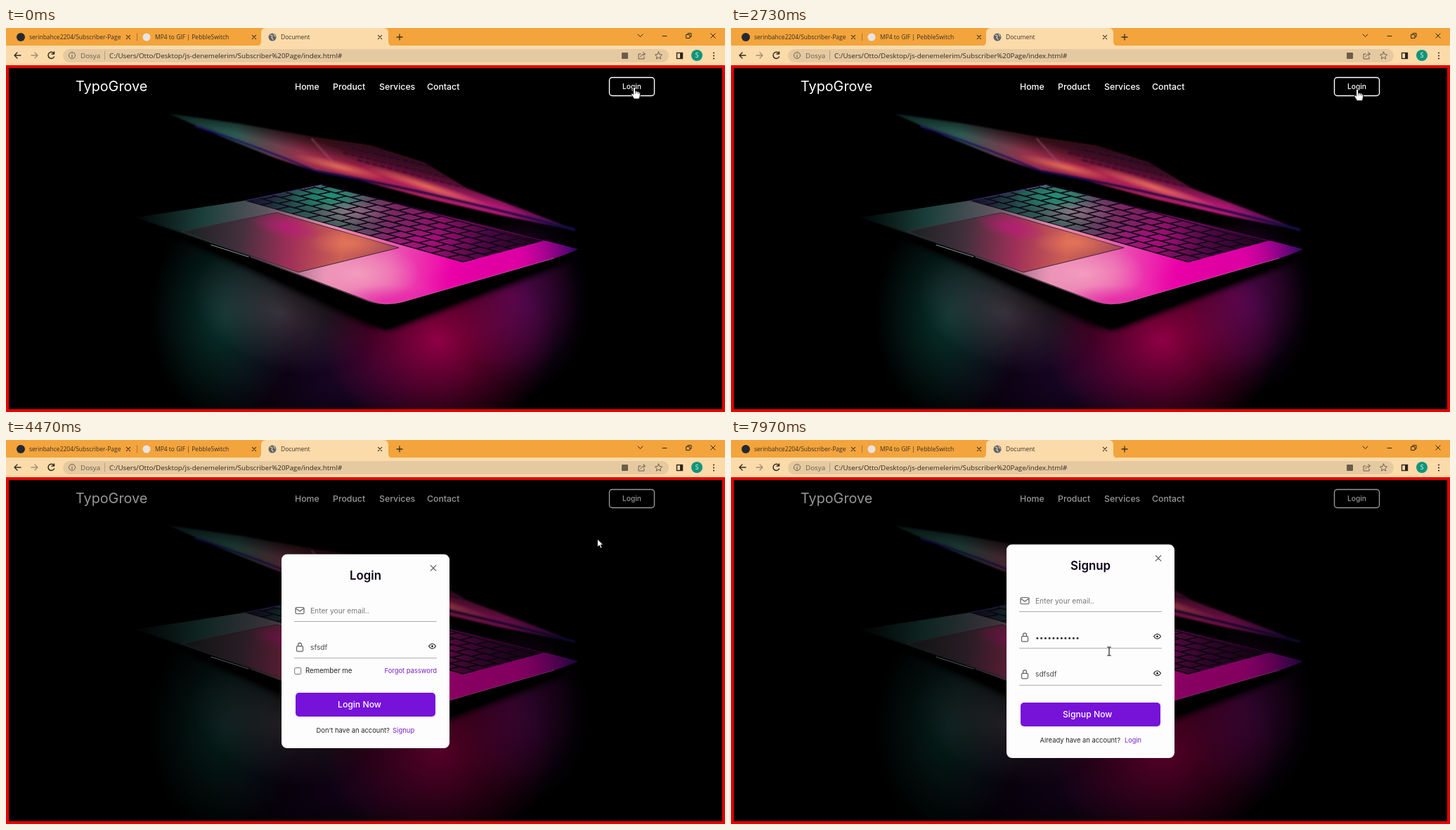
Animation of 1023x547 px, one loop 8000 ms. Source, as an HTML page:

```html
<!DOCTYPE html>
<html lang="en">
<head>
<meta charset="utf-8">
<title>Login popup</title>
<style>
html, body { margin: 0; width: 100%; height: 100%; overflow: hidden; background: #000; }
svg { display: block; width: 100%; height: 100%; }
text { font-family: Inter, sans-serif; white-space: pre; }
.ui text { font-family: "Open Sans", "Noto Sans", sans-serif; }
.line { fill: none; stroke-linecap: round; stroke-linejoin: round; }
</style>
</head>
<body>
<svg id="stage" viewBox="0 0 1023 547" preserveAspectRatio="none" xmlns="http://www.w3.org/2000/svg"></svg>
<script>
const LOOP = 8000, OPEN_AT = 4010, SWITCH_AT = 6200;
const PURPLE = '#7712d9', LINK = '#7a1fc4';

const text = (x, y, size, fill, str, extra = '') =>
  `<text x="${x}" y="${y}" font-size="${size}" fill="${fill}" ${extra}>${str}</text>`;
const line = (d, color, width = 1, extra = '') =>
  `<path class="line" d="${d}" stroke="${color}" stroke-width="${width}" ${extra}/>`;
const rect = (x, y, w, h, fill, rx = 0, extra = '') =>
  `<rect x="${x}" y="${y}" width="${w}" height="${h}" rx="${rx}" fill="${fill}" ${extra}/>`;
const circle = (x, y, r, fill, extra = '') =>
  `<circle cx="${x}" cy="${y}" r="${r}" fill="${fill}" ${extra}/>`;
const poly = (points, fill, extra = '') => `<polygon points="${points}" fill="${fill}" ${extra}/>`;
const cross = (x, y, r, color, width) =>
  line(`M${x - r} ${y - r}l${2 * r} ${2 * r}M${x + r} ${y - r}l${-2 * r} ${2 * r}`, color, width);
const glow = (x, y, rx, ry, color, opacity = 1, angle = 0) =>
  `<ellipse rx="${rx}" ry="${ry}" fill="url(#glow-${color.slice(1)})" opacity="${opacity}" transform="translate(${x} ${y}) rotate(${angle})"/>`;

const GLOWS = ['#0d4a42', '#13a07c', '#a8004f', '#e000a0', '#52107a', '#f5a0c0', '#ff8a5a', '#c01880', '#5a4a58', '#000000'];

function linear(id, x1, y1, x2, y2, ...colors) {
  const stops = colors.map((c, i) => `<stop offset="${i / (colors.length - 1)}" stop-color="${c}"/>`);
  return `<linearGradient id="${id}" gradientUnits="userSpaceOnUse" x1="${x1}" y1="${y1}" x2="${x2}" y2="${y2}">${stops.join('')}</linearGradient>`;
}

const BASE = 'M184 270L345 245L450 223Q625 266 814 315Q800 322 780 328L565 390Q540 397 515 388L345 324Z';
const KEYBOARD = '340,246 450,224 765,303 650,334';
const LID = '232,122 330,136 440,156 520,168 595,192 655,228 735,258 814,289 700,266 600,243 500,216 440,204 380,184 300,152';

function defs() {
  const radial = GLOWS.map(c => `<radialGradient id="glow-${c.slice(1)}">
    <stop offset="0" stop-color="${c}"/><stop offset=".5" stop-color="${c}" stop-opacity=".5"/>
    <stop offset="1" stop-color="${c}" stop-opacity="0"/></radialGradient>`).join('');
  return `<defs>${radial}
    ${linear('lid', 232, 120, 800, 290, '#06211f', '#2c5a50', '#94304c', '#a8204c', '#b02060', '#b8187a', '#30084a')}
    ${linear('lid-shade', 531, 166, 520, 205, '#000000d8', '#000000a0', '#00000000')}
    ${linear('body', 190, 275, 818, 315, '#010807', '#1b3f3a', '#5d5560', '#e58cb0', '#ea5ab0', '#ee00aa', '#d800a8', '#2a0860')}
    ${linear('pad', 262, 290, 550, 315, '#1d2224', '#43303c', '#a02f58', '#cc6055', '#a84a58')}
    ${linear('keys', 345, 246, 750, 310, '#140c28', '#24504c', '#4a625e', '#782862', '#8a1266', '#4a0842', '#20051f')}
    <filter id="soft"><feGaussianBlur stdDeviation="1.2"/></filter>
    <filter id="shadow-blur"><feGaussianBlur stdDeviation="4"/></filter>
    <clipPath id="body-clip"><path d="${BASE}"/></clipPath>
    <clipPath id="keys-clip"><polygon points="${KEYBOARD}"/></clipPath>
    <clipPath id="lid-clip"><polygon points="${LID}"/></clipPath>
    <clipPath id="page-clip"><rect x="4" y="57" width="1015" height="486"/></clipPath>
    <clipPath id="tab-clip"><rect x="30" y="0" width="133" height="25"/></clipPath>
  </defs>`;
}

function keyCaps() {
  let caps = '';
  for (let row = 0; row < 6; row++)
    for (let col = -1; col < 14; col++)
      caps += `<rect x="${(col + row % 3 * .3) / 14}" y="${row / 6}" width="${1 / 14}" height="${1 / 6}"/>`;
  return `<g clip-path="url(#keys-clip)"><g transform="matrix(310 87 112 -25 340 246)" fill="none" stroke="#120818" stroke-width="1.3">
    ${caps.replaceAll('/>', ' vector-effect="non-scaling-stroke"/>')}</g></g>`;
}

function photo() {
  return `<g clip-path="url(#page-clip)">
    ${glow(310, 410, 105, 150, '#0d4a42', .7)}
    ${glow(390, 405, 130, 80, '#5a4a58', .6, 22)}
    ${glow(480, 500, 190, 110, '#52107a', .3)}
    ${glow(615, 445, 165, 140, '#a8004f', .85)}
    ${glow(720, 385, 95, 110, '#a8004f', .45)}
    ${glow(740, 390, 90, 130, '#52107a', .45)}
    ${poly('180,272 345,325 540,392 812,318 795,336 548,430 520,426 345,343', '#000', 'filter="url(#shadow-blur)"')}
    ${poly('180,272 345,325 540,394 812,318 790,334 540,430 345,340', '#000', 'filter="url(#soft)"')}
    <g filter="url(#soft)">
      ${poly(LID, 'url(#lid)')}
      <g clip-path="url(#lid-clip)">
        ${glow(545, 180, 90, 18, '#c01880', .6, 15)}
        ${poly(LID, 'url(#lid-shade)')}
        ${glow(475, 198, 70, 8, '#ff8a5a', .7, 14)}
        ${glow(600, 226, 100, 8, '#ff8a5a', .7, 18)}
        ${line('M480 178L625 212M490 171L610 199M500 188L650 227', '#26062f', 2, 'stroke-dasharray="7 4"')}
      </g>
      ${line('M270 140Q350 166 440 203', '#1c0e5a', 3)}
      ${line('M443 204Q600 232 808 287', '#160a44', 4)}
      ${line('M435 158L467 193', '#b0607a', 1)}
    </g>
    <path d="${BASE}" fill="url(#body)"/>
    <g clip-path="url(#body-clip)">
      ${glow(500, 350, 90, 42, '#f5a0c0', .9)}
      ${glow(700, 340, 110, 38, '#e000a0', .9, -15)}
      ${glow(540, 388, 75, 22, '#e000a0', .5)}
      ${glow(250, 298, 90, 10, '#000000', .7, 18)}
    </g>
    ${poly('250,290 385,263 559,313 416,348', 'url(#pad)', 'stroke="#3d2536" stroke-width="1"')}
    ${glow(400, 284, 52, 17, '#c01880', .7, 12)}
    ${glow(490, 306, 60, 20, '#ff8a5a', .5)}
    ${poly(KEYBOARD, 'url(#keys)')}
    <g clip-path="url(#keys-clip)">
      ${glow(460, 240, 60, 22, '#13a07c', .8)}
      ${glow(490, 262, 60, 18, '#f5a0c0', .35)}
      ${glow(590, 302, 80, 22, '#e000a0', .4)}
    </g>
    ${keyCaps()}
    ${line('M450 223L768 302', '#0a0410', 2.5)}
    ${line('M340 246L450 223', '#3a2a78', 1.2)}
    ${line('M292 309L345 326', '#7f9089', 1.2)}
    ${line('M348 326L515 389Q540 397 565 390L780 328', '#f0a0c8', .8, 'opacity=".6"')}
  </g>`;
}

function browser() {
  const ink = '#3a3024', gray = '#6b5d4a';
  return `<g class="ui">
    ${rect(0, 0, 1023, 26, '#f3a43c')}
    <path d="M356 26Q363 26 363 19V7Q363 0 370 0H537Q544 0 544 7V19Q544 26 551 26Z" fill="#fcdbaa"/>
    ${rect(0, 25, 1023, 28, '#fcdbaa')}
    ${rect(81, 30, 862, 19, '#e5c9a0', 9.5)}
    ${circle(21, 13, 6, '#24292f')}
    ${text(33, 16, 8.5, ink, 'serinbahce2204/Subscriber-Pages', 'clip-path="url(#tab-clip)"')}
    ${circle(200, 13, 5.5, '#e9e4e2')}
    ${text(212, 16, 8.5, ink, 'MP4 to GIF | PebbleSwitch')}
    ${circle(379, 13, 5.5, '#5f6368')}
    ${line('M376 10l3 1l-1 3l2 2M381 9l2 3', '#e9d2ae', 1.2)}
    ${text(391, 16, 8.5, ink, 'Document')}
    ${[174, 353, 532].map(x => cross(x, 13, 2.6, ink, 1.1)).join('')}
    ${line('M186.500 8V18', '#a77635', 1)}
    ${line('M556 13H564M560 9V17', ink, 1.3)}
    ${line('M899 9L902.500 12.500L906 9M934 11.500H940M968 9.500H973V14.500H968ZM970 9V7.500H975V12.500H973.500', '#33281a', 1)}
    ${cross(1006, 11, 3.2, '#33281a', 1)}
    ${line('M21 39H12M16 35L12 39L16 43', '#332b21', 1.4)}
    ${line('M36 39H45M41 35L45 39L41 43', '#a58f70', 1.4)}
    ${line('M68 36A4.500 4.500 0 1 0 68.500 41M68.500 34V37H65', '#332b21', 1.5)}
    ${circle(94, 39, 4.5, 'none', `stroke="${gray}"`)}
    ${line('M94 38.500V41.500M94 36.600V36.700', gray, 1.1)}
    ${text(106, 42.5, 9.8, gray, 'Dosya')}
    ${line('M140.500 33V45', '#b79f7c', 1)}
    ${text(147, 42.5, 9.8, '#33291d', 'C:/Users/Otto/Desktop/js-denemelerim/Subscriber%20Page/index.html#')}
    ${rect(876, 35, 9, 9, gray, 1)}
    ${line('M903 37H900V44H908V41M903 41Q904 37 909 37M906.500 34.500L909.500 37L906.500 39.500', gray, 1)}
    ${line('M928.500 34L930 37.500L933.500 38L931 40.500L931.500 44L928.500 42L925.500 44L926 40.500L923.500 38L927 37.500Z', gray, 1)}
    ${rect(954.5, 35.5, 8, 8, 'none', 0, 'stroke="#2d251b" stroke-width="1.4"')}${rect(959, 35, 4, 9, '#2d251b')}
    ${circle(983, 39, 8, '#10957a')}
    ${text(983, 42, 8.5, '#fff', 'S', 'text-anchor="middle"')}
    ${[35.5, 39.5, 43.5].map(y => circle(1007, y, 1.1, ink)).join('')}
  </g>`;
}

function header() {
  const nav = [[411, 'Home'], [465, 'Product'], [531, 'Services'], [599, 'Contact']];
  return text(99, 90, 19.8, '#fff', 'TypoGrove')
    + nav.map(([x, label]) => text(x, 88, 12.3, '#fff', label, 'font-weight="500"')).join('')
    + rect(858.5, 70.5, 64, 26, 'none', 4, 'stroke="#fff" stroke-width="1.4"')
    + text(890.5, 86.7, 10.2, '#fff', 'Login', 'text-anchor="middle" font-weight="500"');
}

const mail = y => rect(412, y - 4.5, 12, 9, 'none', 1.5, 'stroke="#606068" stroke-width="1.2"')
  + line(`M412.500 ${y - 3}L418 ${y + 1}L423.500 ${y - 3}`, '#606068', 1.2);
const lock = y => rect(413.5, y - 1.5, 9, 7.5, 'none', 1.5, 'stroke="#606068" stroke-width="1.2"')
  + line(`M415.500 ${y - 2}V${y - 3.5}a2.500 2.500 0 0 1 5 0V${y - 2}`, '#606068', 1.2);
const eye = y => line(`M601.500 ${y}Q606.500 ${y - 7} 611.500 ${y}Q606.500 ${y + 7} 601.500 ${y}Z`, '#26262c', 1.1)
  + circle(606.5, y, 1.5, '#26262c');

// y is the underline of the field
const field = (y, icon, value, color, hasEye) => icon(y - 15.5) + text(433, y - 12, 10.2, color, value)
  + (hasEye ? eye(y - 17) : '') + line(`M410.500 ${y}H612.500`, '#aaaaad', 1);

function card(top, bottom, title, action, fields) {
  return rect(392, top, 239, bottom - top, '#fdfdfd', 8)
    + text(511.5, top + 36.7, 16.8, '#0b0217', title, 'text-anchor="middle" font-weight="600"')
    + cross(608, top + 19.7, 3.7, '#55555e', 1.2)
    + field(top + 95.8, mail, 'Enter your email..', '#77777a')
    + fields
    + rect(412, bottom - 79, 199, 34, PURPLE, 5)
    + text(472, bottom - 57.8, 12.2, '#fff', action, 'font-weight="500"');
}

const loginCard = () => card(162.7, 439, 'Login', 'Login Now',
  field(310.7, lock, 'sfsdf', '#4a4a4e', true)
  + rect(410.7, 324.5, 9, 9, '#fff', 1.5, 'stroke="#77777c"')
  + text(426, 332.3, 9.7, '#242428', 'Remember me')
  + text(613, 332.3, 9.4, LINK, 'Forgot password', 'text-anchor="end"'))
  + text(441.5, 416.5, 9.4, '#242428', "Don't have an account?")
  + text(550, 416.5, 9.5, LINK, 'Signup', 'id="signup-link"');

const signupCard = () => card(148.7, 453, 'Signup', 'Signup Now',
  field(296.7, lock, '•'.repeat(11), '#333', true)
  + field(349.3, lock, 'sdfsdf', '#4a4a4e', true))
  + text(439.5, 430.5, 9.4, '#242428', 'Already have an account?')
  + text(560, 430.5, 9.2, LINK, 'Login');

const cursors = `
  <g id="cursor">
    <path id="arrow" d="M0 0V11.500L2.700 9L4.600 13.200L6.500 12.300L4.700 8.300H8.200Z" fill="#fff" stroke="#000" stroke-width=".8"/>
    <g id="hand"><path d="M-1.500 1.300Q0 -.8 1.500 1.300V6Q3 5 4 6.500Q5.500 5.700 6.300 7.200Q8.300 6.800 8.300 9V12Q8 15 6.500 17H-.5Q-2 14 -4 11.500Q-5 9 -3 9L-1.500 10.500Z" fill="#fff" stroke="#111" stroke-width="1"/>
      ${line('M1.500 6V9M4 6.500V9M6.300 7.200V9.500', '#111', .7)}</g>
    <g id="beam">${line('M-2.500 -6H2.500M0 -6V6M-2.500 6H2.500', '#222', 1.2)}</g>
  </g>`;

const stage = document.getElementById('stage');
stage.innerHTML = defs() + rect(0, 0, 1023, 547, '#000') + photo() + header()
  + rect(4, 57, 1015, 486, '#000', 0, 'id="shade"')
  + rect(2, 55, 1019, 490, 'none', 0, 'stroke="#e80000" stroke-width="4"')
  + browser()
  + `<g id="popup"><g id="login">${loginCard()}</g><g id="signup">${signupCard()}</g></g>` + cursors;

const el = id => document.getElementById(id);
const [shade, popup, login, signup, link, cursor] =
  ['shade', 'popup', 'login', 'signup', 'signup-link', 'cursor'].map(el);
const shapes = ['arrow', 'hand', 'beam'].map(el);

// time, x, y of the pointer's hot spot
const path = [[0, 894, 84], [1000, 894, 84], [1700, 889, 84.5], [2400, 889, 84.5], [3300, 896, 91.5],
  [4260, 896, 91.5], [4470, 841.5, 141], [5250, 584, 416], [6300, 584, 416], [7100, 538, 301], [LOOP, 538, 301]];

function pointer(t) {
  const i = path.findIndex(p => p[0] > t);
  const [t0, x0, y0] = path[i - 1], [t1, x1, y1] = path[i];
  const p = (t - t0) / (t1 - t0), k = p * p * (3 - 2 * p);
  return [x0 + (x1 - x0) * k, y0 + (y1 - y0) * k];
}

function pointerShape(t) {
  if (t < 1300 || (t > 2700 && t < 4290)) return 'hand';
  if (t > 5150 && t < SWITCH_AT + 60) return 'hand';
  return t > 6800 ? 'beam' : 'arrow';
}

const show = (node, visible) => node.setAttribute('display', visible ? 'inline' : 'none');

function draw(t) {
  const p = Math.min(1, Math.max(0, (t - OPEN_AT) / 400));
  const open = 1 - (1 - p) ** 1.8;
  const scale = 1.2 - .2 * open;
  shade.setAttribute('opacity', .41 * open);
  popup.setAttribute('opacity', open);
  popup.setAttribute('transform', `translate(511.5 300.8) scale(${scale}) translate(-511.5 -300.8)`);
  show(login, t < SWITCH_AT);
  show(signup, t >= SWITCH_AT);
  const [x, y] = pointer(t), shape = pointerShape(t);
  link.setAttribute('text-decoration', t > 5150 ? 'underline' : 'none');
  cursor.setAttribute('transform', `translate(${x} ${y})`);
  shapes.forEach(s => show(s, s.id === shape));
}

const start = performance.now();
function tick() {
  draw((performance.now() - start) % LOOP);
  requestAnimationFrame(tick);
}
tick();
</script>
</body>
</html>
```
